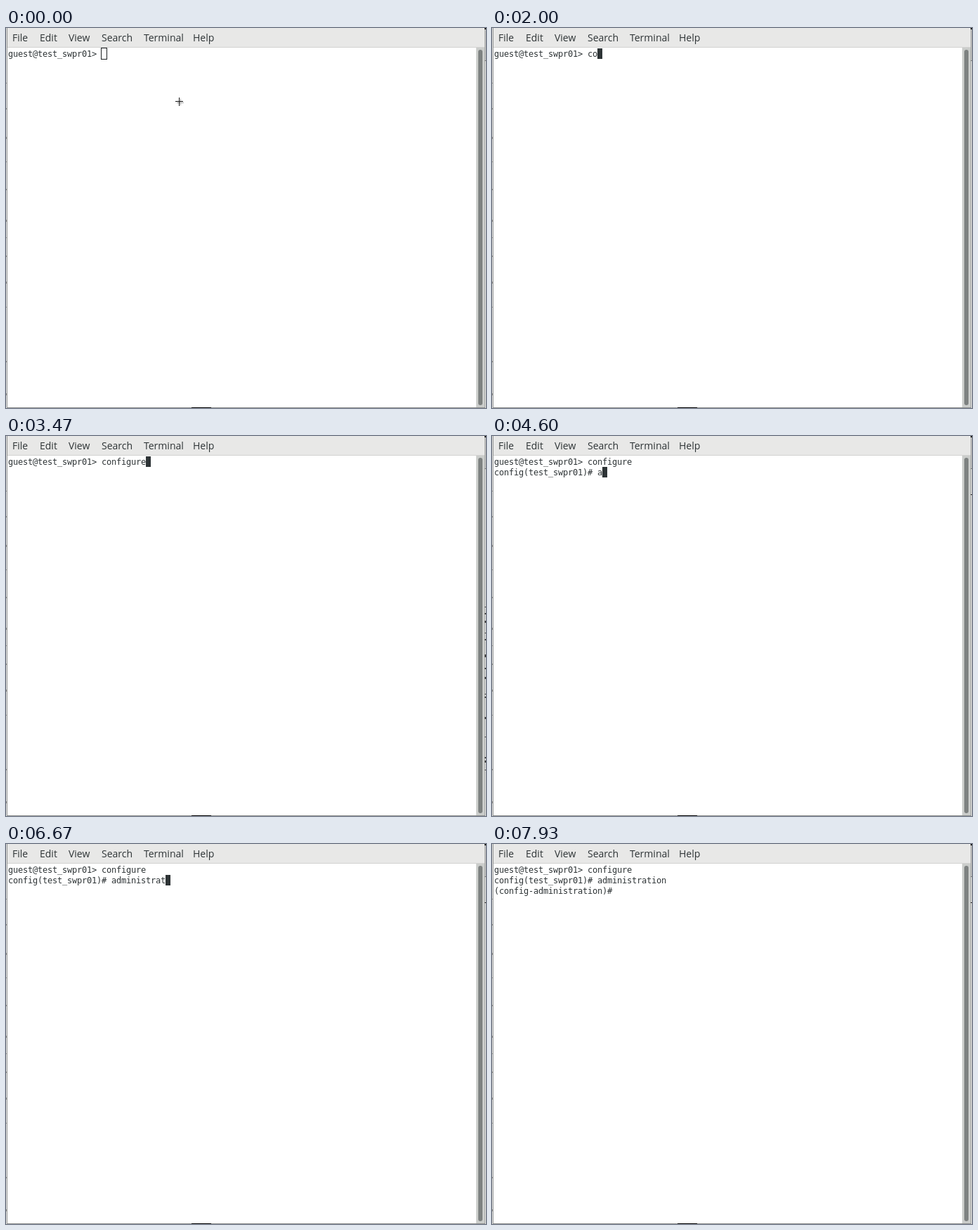
These frames come from a looping animation (683x541 px, 8000 ms). An HTML page:

```html
<!DOCTYPE html>
<html lang="en">
<head>
<meta charset="utf-8">
<title>Terminal session</title>
<style>
  html, body { margin: 0; width: 100%; height: 100%; overflow: hidden; background: #fff; }
  #stage { position: relative; width: 683px; height: 541px; overflow: hidden; background: #fff; }
  #stage div, #stage svg { position: absolute; }
  .menu { left: 2px; top: 0; width: 679px; height: 27px; background: #e8e8e7; border-bottom: 1px solid #d2d2d1; }
  .menu span { position: absolute; font: 14px/27px "Open Sans", "Noto Sans", sans-serif; color: #2e3436; }
  .track { left: 669px; top: 28px; width: 12px; height: 512px; background: #cbcdcb; }
  .thumb { left: 3px; top: 3px; width: 6px; height: 506px; border-radius: 3px; background: #7e8281; }
  .row { left: 3px; height: 15px; font: 12px/15px "DejaVu Sans Mono", monospace; color: #2e3436; white-space: pre; }
  #cursor { width: 7px; height: 15px; background: #2e3436; }
  #cursor.hollow { box-sizing: border-box; width: 9px; height: 17px; margin: -1px; background: none; border: 1px solid #1d2123; }
</style>
</head>
<body>
<div id="stage">
  <div class="menu" id="menu"></div>
  <div class="track"><div class="thumb"></div></div>
  <svg id="edges" width="683" height="541" shape-rendering="crispEdges">
    <path d="M0 0h1v541h-1z" fill="#e9e9e9"/>
    <path d="M1 0h1v541h-1z" fill="#8e908f"/>
    <path d="M681 0h1v541h-1z" fill="#a3a5a4"/>
    <path d="M682 0h1v541h-1z" fill="#e4e4e4"/>
    <path d="M682 0h1v46h-1z" fill="#c4c4c4"/>
    <path d="M1 540h681v1h-681z" fill="#8e908f"/>
    <path d="M264 540h28v1h-28z M681 0h2v2h-2z" fill="#000"/>
    <path d="M681 46h2v1h-2z" fill="#777"/>
    <g id="left"></g>
    <g id="right"></g>
    <path id="rule" d="M681 83h2v1h-2z" fill="#222"/>
  </svg>
  <div id="cursor"></div>
  <svg id="pointer" width="683" height="541" fill="none" stroke="#111">
    <path id="cross" d="M241 104.5h11M246.5 99v11M243 106.5h10M248.5 101v9" stroke="#aaa"/>
    <path id="crossCore" d="M241 104.5h11M246.5 99v12"/>
    <path id="arrow" d="M246.5 105v13l3-3 2 4 2-1-2-4h4z" fill="#111" stroke="#fff"/>
    <path id="beam" d="M243 99.5h2.5l1 1 1-1h2M243 110.5h2.5l1-1 1 1h2M246.5 100v10"/>
  </svg>
</div>
<script>
const LOOP = 8000, CELL = 7, LINE = 15, LEFT = 3, TOP = 29;
const $ = id => document.getElementById(id);
const stage = $('stage'), cursor = $('cursor');

const menu = { File: 9, Edit: 48, View: 89, Search: 136, Terminal: 196, Help: 266 };
for (const [label, x] of Object.entries(menu)) {
  const item = document.createElement('span');
  item.textContent = label;
  item.style.left = x - 2 + 'px';
  $('menu').append(item);
}

// Slivers of the window behind, peeking out at both sides.
function slivers(group, x, width, ys, color) {
  group.innerHTML = ys.map((y, i) =>
    `<rect x="${x}" y="${y}" width="${width}" height="${1 + i % 3}" fill="${color}"/>`).join('');
}
slivers($('left'), 0, 1, [78, 114, 155, 190, 229, 273, 298, 324, 361, 397, 474, 520], '#999');
slivers($('right'), 681, 2, [243, 252, 263, 280, 289, 311, 314, 330, 343, 367, 371, 400, 428, 457, 462, 475], '#444');

// Each line: when its prompt shows, and when each key of its command lands.
const lines = [
  { at: 0, prompt: 'guest@test_swpr01> ', command: 'configure',
    keys: [1600, 2000, 2270, 2470, 2530, 2930, 3070, 3330, 3470] },
  { at: 4000, prompt: 'config(test_swpr01)# ', command: 'administration',
    keys: [4600, 4870, 5000, 5270, 5470, 5530, 5800, 6070, 6130, 6470, 6670, 6800, 6870, 7000] },
  { at: 7800, enter: 7400, prompt: '(config-administration)# ', command: '', keys: [] }
];

lines.forEach((line, i) => {
  line.el = document.createElement('div');
  line.el.className = 'row';
  line.el.style.top = TOP + 1 + i * LINE + 'px';
  stage.insertBefore(line.el, cursor);
});

// Snap the font's advance to the terminal's cell grid.
const probe = lines[0].el;
probe.textContent = '0'.repeat(50);
const spacing = CELL - probe.getBoundingClientRect().width / 50;
for (const line of lines) line.el.style.letterSpacing = spacing + 'px';

const show = (id, on) => { $(id).style.visibility = on ? 'visible' : 'hidden'; };
const within = (t, from, to) => t >= from && t < to;

function draw(t) {
  let row = 0, col = 0;
  lines.forEach((line, i) => {
    const typed = line.keys.filter(k => k <= t).length;
    const text = t >= line.at ? line.prompt + line.command.slice(0, typed) : '';
    if (line.el.textContent !== text) line.el.textContent = text;
    if (t >= (line.enter ?? line.at)) { row = i; col = text.length; }
  });
  cursor.style.left = LEFT + col * CELL + 'px';
  cursor.style.top = TOP + row * LINE + 'px';
  cursor.className = t < 600 ? 'hollow' : '';
  show('cursor', !within(t, 1200, 1600) && t < 7930);

  show('cross', t < 530);
  show('crossCore', t < 530);
  show('arrow', within(t, 530, 600));
  show('beam', within(t, 600, 1670));
  show('right', within(t, 3130, 4330));
  show('rule', t >= 4330);
}

const start = performance.now();
function tick() {
  draw((performance.now() - start) % LOOP);
  requestAnimationFrame(tick);
}
tick();
</script>
</body>
</html>
```
